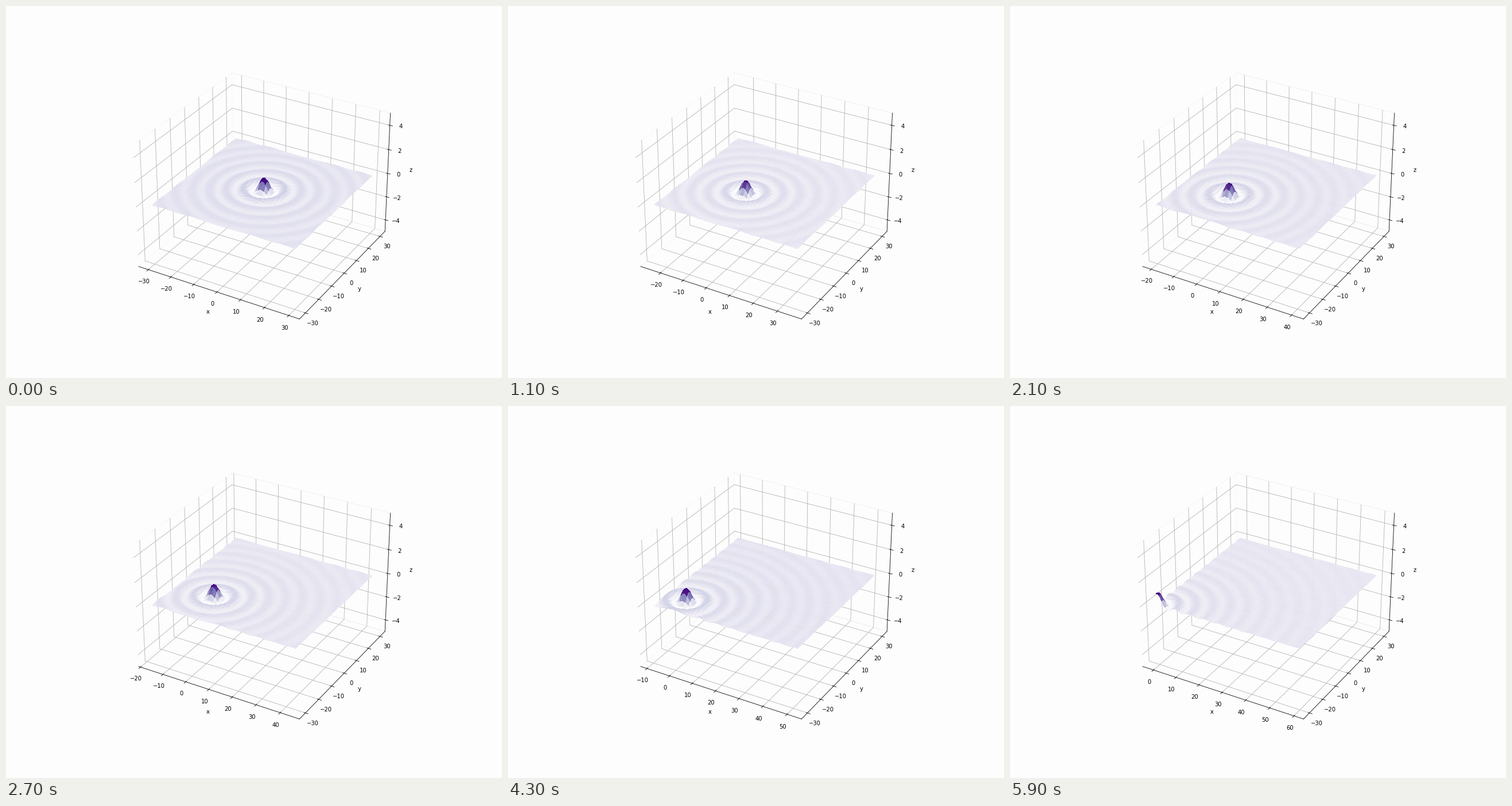
Recreate the animation shown at these times as a matplotlib script. Size 864 by 648 pixels, loop 6 s.

```python
import numpy as np
import matplotlib.pyplot as plt
from matplotlib.animation import FuncAnimation
from matplotlib.ticker import MultipleLocator

FRAMES = 60
STEP = 0.5                          # distance the window slides per frame
EXTENT = 30
LIMIT = EXTENT * 1.1 * 25 / 24      # data range plus margins
PAPER = "#fdfdfd"

plt.rcParams["font.family"] = "DejaVu Sans"
plt.rcParams["font.size"] = 10

fig = plt.figure(figsize=(12, 9), dpi=72, facecolor=PAPER)
ax = fig.add_subplot(projection="3d", facecolor=PAPER)
ax.view_init(elev=30, azim=-60)
ax.set_xlabel("x")
ax.set_ylabel("y")
ax.set_zlabel("z")
ax.set_ylim(-LIMIT, LIMIT)
ax.set_zlim(-5, 5)
for axis, spacing in ((ax.xaxis, 10), (ax.yaxis, 10), (ax.zaxis, 2)):
    axis.pane.set_fill(False)
    axis.set_major_locator(MultipleLocator(spacing))

line = np.linspace(-EXTENT, EXTENT, 101)
grid_x, grid_y = np.meshgrid(line, line)


def ripple(x, y):
    """sin(r) / r around the origin."""
    return np.sinc(np.hypot(x, y) / np.pi)


def draw(i):
    shift = STEP * i
    for surface in list(ax.collections):
        surface.remove()
    ax.set_xlim(shift - LIMIT, shift + LIMIT)
    x = grid_x + shift
    z = ripple(x, grid_y + shift)
    ax.plot_surface(x, grid_y, z, rstride=2, cstride=2, cmap="Purples",
                    alpha=0.9, linewidth=0, antialiased=False)
    return ax.collections


anim = FuncAnimation(fig, draw, frames=FRAMES, interval=100,
                     repeat=True, repeat_delay=0, blit=False)
plt.show()
```
